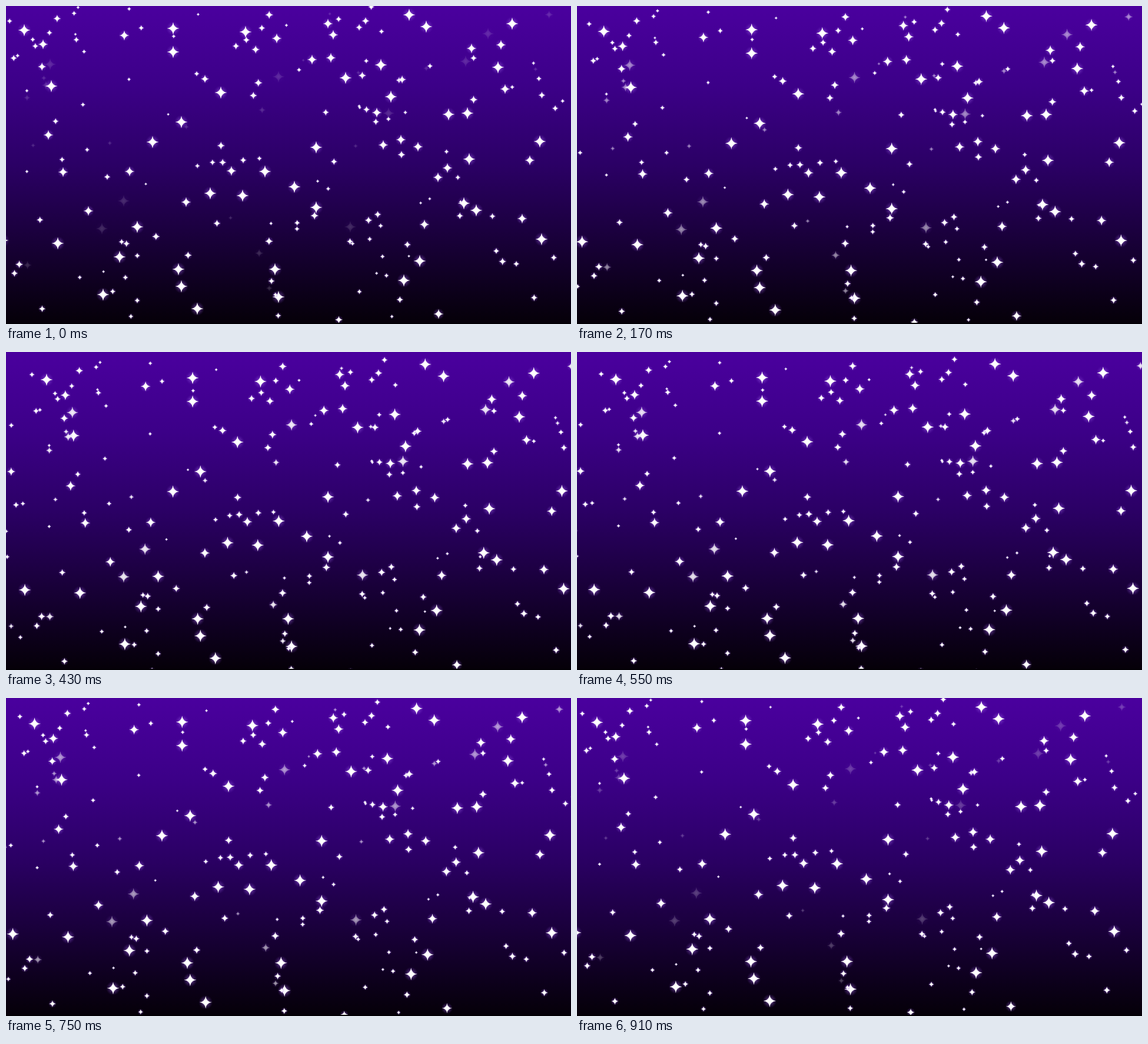
These frames come from a looping animation (960x540 px, 950 ms). An HTML page with a canvas:

```html
<!DOCTYPE html>
<html lang="en">
<head>
<meta charset="utf-8">
<title>Drifting stars</title>
<style>
  html, body { margin: 0; width: 100%; height: 100%; overflow: hidden; background: #050008; }
  canvas { display: block; width: 960px; height: 540px; }
</style>
</head>
<body>
<canvas id="sky" width="960" height="540"></canvas>
<script>
const W = 960, H = 540, LOOP = 950, TURN = 14, STEPS = 28;
const ctx = document.getElementById('sky').getContext('2d');

// Anchor stars as x, y at the start of the drift; the rest are seeded.
const bright = [
  31,41, 284,38, 284,78, 298,197, 249,231, 407,44, 365,147, 527,342,
  490,307, 402,322, 440,281, 347,318, 223,375, 88,403, 193,426, 165,490,
  298,476, 293,447, 325,514, 457,447, 463,494, 676,466, 778,335, 799,347,
  787,260, 784,182, 752,184, 654,154, 637,100, 714,35, 685,15, 860,30,
  907,230, 836,104, 577,122, 527,240, 910,396, 703,433, 77,136, -6,398
];
const medium = [
  63,65, 201,50, 460,55, 547,30, 556,49, 552,88, 520,91, 791,72,
  841,66, 848,141, 671,227, 641,236, 700,239, 630,181, 750,275, 734,291,
  890,262, 877,361, 711,371, 72,219, 97,282, 383,280, 210,281, 140,348,
  306,333, 735,523
];
// These brighten during the drift.
const rising = [
  163,378, 650,182, 585,375, 781,94, 200,331, 463,120, 819,47, 75,99
];

let seed = 71;
function rand() {
  seed = (seed * 1664525 + 1013904223) % 4294967296;
  return seed / 4294967296;
}

const stars = [];
function addAll(points, size, fall, rises) {
  for (let i = 0; i < points.length; i += 2) {
    stars.push({ x: points[i], y: points[i + 1], size, fall, rises });
  }
}
addAll(bright, 10.5, 6.5, false);
addAll(medium, 8.5, 9, false);
addAll(rising, 10, 4, true);
for (let i = 0; i < 150; i++) {
  const size = 2.5 + 4.8 * rand();
  stars.push({
    x: -40 + 1000 * rand(),
    y: 535 * Math.pow(rand(), 1.3),
    size,
    fall: 21 - 1.5 * size,
    rises: rand() < 0.1
  });
}

// Sideways travel is slowest a little right of the centre.
function travel(x) {
  const u = (x - 545) / (x < 545 ? 230 : 195);
  return 41 - 19.5 * Math.exp(-u * u);
}

const sky = ctx.createLinearGradient(0, 0, 0, H);
sky.addColorStop(0, '#4a009e');
sky.addColorStop(0.25, '#3c0088');
sky.addColorStop(0.5, '#2b0065');
sky.addColorStop(0.72, '#1a003c');
sky.addColorStop(0.9, '#0c001a');
sky.addColorStop(1, '#050008');

const halo = ctx.createRadialGradient(0, 0, 0, 0, 0, 1.15);
halo.addColorStop(0, 'rgba(255,250,255,0.95)');
halo.addColorStop(0.25, 'rgba(225,195,255,0.65)');
halo.addColorStop(0.55, 'rgba(165,105,235,0.28)');
halo.addColorStop(1, 'rgba(120,50,210,0)');

const spark = new Path2D();
spark.moveTo(0, -1);
for (const [x, y] of [[1, 0], [0, 1], [-1, 0], [0, -1]]) {
  const from = [y, -x];
  spark.quadraticCurveTo((x + from[0]) * 0.1, (y + from[1]) * 0.1, x, y);
}

function drawStar(star, pos) {
  const k = pos / TURN;
  ctx.save();
  ctx.translate(star.x + travel(star.x) * k, star.y + star.fall * k);
  ctx.scale(star.size, star.size);
  ctx.globalAlpha = star.rises ? 0.1 + 0.75 * k : 1;
  ctx.fillStyle = halo;
  ctx.fillRect(-1.2, -1.2, 2.4, 2.4);
  ctx.fillStyle = '#fff';
  ctx.fill(spark);
  ctx.restore();
}

function draw(step) {
  const pos = step <= TURN ? step : STEPS - step;
  ctx.fillStyle = sky;
  ctx.fillRect(0, 0, W, H);
  for (const star of stars) drawStar(star, pos);
  ctx.fillStyle = '#030005';
  ctx.fillRect(0, H - 2, W, 2);
}

// Thirty steps a second on a 10 ms grid, with a short hold after the turn.
const starts = Array.from({ length: STEPS }, (_, i) =>
  i <= TURN ? Math.round(i * 10 / 3) * 10 : Math.floor((2 * i + 1) * 5 / 3) * 10);

let shown = -1;
function tick() {
  const t = performance.now() % LOOP;
  let step = STEPS - 1;
  while (starts[step] > t) step--;
  if (step !== shown) draw(shown = step);
  requestAnimationFrame(tick);
}
tick();
</script>
</body>
</html>
```
